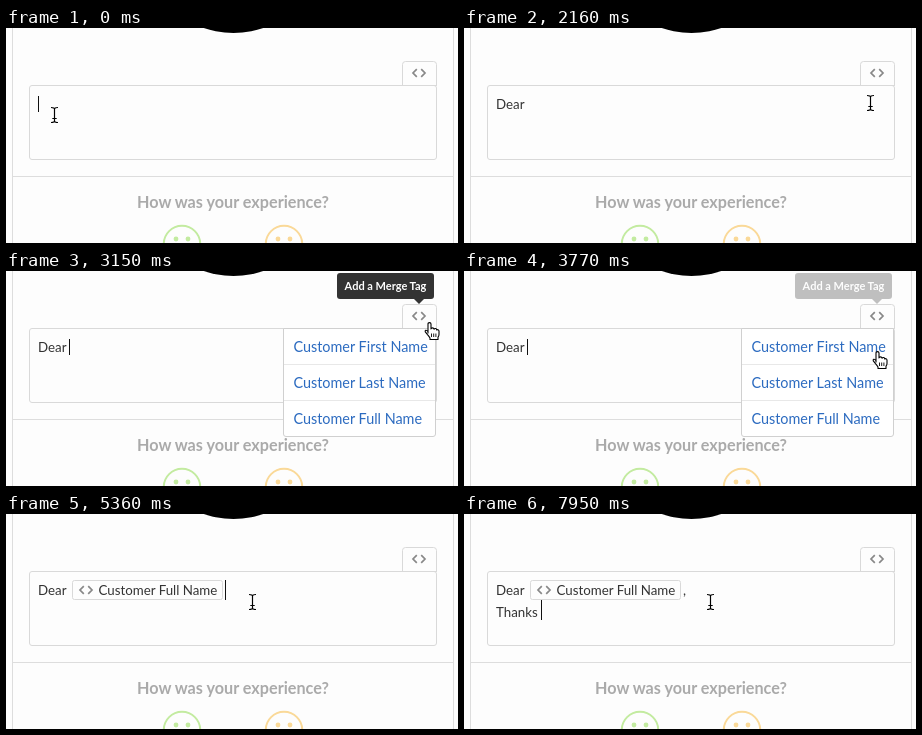
Recreate the animation shown at these times as an HTML page. Size 452 px wide and 215 px high, loop 8000 ms.

```html
<!DOCTYPE html>
<html lang="en">
<head>
<meta charset="utf-8">
<title>Inserting a merge tag</title>
<style>
  html, body { margin: 0; width: 100%; height: 100%; overflow: hidden; background: #fdfdfd; }
  svg { display: block; width: 452px; height: 215px; }
  text { font: 13.3px Lato, sans-serif; fill: #333; white-space: pre; }
  .box { fill: #fdfdfd; stroke: #d9d9d9; }
  .icon { fill: none; stroke: #888; stroke-width: 1.7; }
  .question { font-size: 16.2px; font-weight: bold; fill: #aaa; text-anchor: middle; }
  .tip { font-size: 11px; font-weight: bold; fill: #fff; text-anchor: middle; }
  #menu text { font-size: 14.4px; fill: #2c6bc0; }
  .face { fill: none; stroke-width: 2; }
</style>
</head>
<body>
<svg viewBox="0 0 452 215">
  <defs>
    <path id="chevrons" class="icon" d="M-2.2-3.8L-6 0L-2.2 3.8M2.2-3.8L6 0L2.2 3.8"/>
    <g id="smiley">
      <circle class="face" r="18.2"/>
      <circle cx="-6" cy="-5" r="2.4" stroke="none"/>
      <circle cx="6" cy="-5" r="2.4" stroke="none"/>
    </g>
  </defs>

  <path d="M6.5 0V215M447.5 0V215M7 148.5H447" stroke="#ddd"/>
  <circle cx="227.5" cy="-86" r="91"/>
  <path class="box" d="M396.5 58V36.5q0-3 3-3h28q3 0 3 3V58"/>
  <rect class="box" x="23.5" y="57.5" width="407" height="74" rx="2.5"/>
  <path d="M397 57.5H430" stroke="#d9d9d9"/>
  <use href="#chevrons" x="413" y="45"/>
  <text class="question" x="227" y="180">How was your experience?</text>
  <use href="#smiley" x="176" y="216" fill="#c3eba0" stroke="#c3eba0"/>
  <use href="#smiley" x="278" y="216" fill="#fad998" stroke="#fad998"/>

  <text id="greeting" x="32" y="81"></text>
  <g id="chip">
    <rect class="box" x="66.5" y="66.5" width="150" height="19" rx="2"/>
    <use href="#chevrons" x="80" y="76"/>
    <text x="92.5" y="81">Customer Full Name</text>
  </g>
  <text id="comma" x="219" y="81">,</text>
  <text id="body" x="32" y="103"></text>
  <rect id="caret" width="1" fill="#111"/>

  <g id="menu">
    <path d="M277.5 57.5H429.5V163q0 2.5-2.5 2.5H280q-2.5 0-2.5-2.5Z" fill="#fff" stroke="#d0d0d0"/>
    <path d="M278 93.5H429M278 129.5H429" stroke="#e8e8e8"/>
    <text x="287.5" y="81">Customer First Name</text>
    <text x="287.5" y="117">Customer Last Name</text>
    <text x="287.5" y="153">Customer Full Name</text>
  </g>
  <g id="tooltip">
    <rect x="331" y="2" width="97" height="26" rx="3" fill="#333"/>
    <path d="M408 28H418L413 33Z" fill="#333"/>
    <text class="tip" x="379.5" y="19">Add a Merge Tag</text>
  </g>

  <g id="beam" fill="none">
    <path id="beamShape" d="M-3.5-7.5Q0-7.5 0-6Q0-7.5 3.5-7.5M0-6.5V6.5M-3.5 7.5Q0 7.5 0 6Q0 7.5 3.5 7.5M-2.2 3.5H2.2" stroke="#fff" stroke-width="2.4"/>
    <use href="#beamShape" style="display:none"/>
    <path d="M-3.5-7.5Q0-7.5 0-6Q0-7.5 3.5-7.5M0-6.5V6.5M-3.5 7.5Q0 7.5 0 6Q0 7.5 3.5 7.5M-2.2 3.5H2.2" stroke="#000" stroke-width="1.2"/>
  </g>
  <!-- The origin is the fingertip. -->
  <g id="hand" stroke="#000" stroke-width="1.1" stroke-linejoin="round">
    <path fill="#fff" d="M-1.5 11V2Q-1.5.6 0 .6T1.5 2V7Q1.7 5.9 3 5.9T4.5 7.2Q4.8 6.4 6 6.5T7.2 8Q7.8 7.4 8.6 7.7T9.5 9V12.5Q9.5 14 8.5 15.2V17.5H.5V16Q-.4 14.4-2 12.6L-4.2 9.9Q-4.7 8.8-3.8 8.3T-1.5 9.6Z"/>
    <path d="M2 11.5V15M4.2 11.5V15M6.4 11.5V15" stroke-width=".9"/>
  </g>
  <path id="arrow" d="M0 0V14L3.2 11L5.4 16.4L8 15.3L5.7 10.2H10Z" stroke="#fff" stroke-width="1.2" paint-order="stroke"/>
</svg>
<script>
const LOOP = 8000;
const el = Object.fromEntries([...document.querySelectorAll('[id]')].map(n => [n.id, n]));

const greetingKeys = [810, 990, 1260, 1350, 1440];
const bodyKeys = [7330, 7500, 7590, 7680, 7770, 7860, 7950];
const caretHidden = [[360, 810], [1980, 2520], [4910, 5360], [6430, 6970]];
const menuFade = [[0, 0], [2970, .4], [3060, .8], [3150, 1], [4390, 0]];
const tooltipFade = [[0, 0], [2520, .5], [2610, 1], [3600, .7], [3690, .3], [3780, 0]];

// time, cursor, x, y
const pointer = [
  [0, 'beam', 48, 87], [1980, 'beam', 130, 110], [2070, 'beam', 310, 104], [2160, 'beam', 406, 75],
  [2430, 'arrow', 441, 63], [2520, 'hand', 433, 55], [2610, 'hand', 426, 52], [2700, 'hand', 423, 51],
  [3510, 'hand', 422, 54], [3600, 'hand', 419, 64], [3690, 'hand', 413, 80], [3780, 'hand', 405, 99],
  [3860, 'hand', 397, 117], [3950, 'hand', 388, 131], [4040, 'hand', 381, 139], [4130, 'hand', 378, 141],
  [4390, 'arrow', 378, 142], [4570, 'arrow', 372, 139], [4660, 'beam', 343, 124],
  [4740, 'beam', 296, 105], [4820, 'beam', 260, 92], [4910, 'beam', 246, 88]
];

const latest = (keys, t) => keys.findLast(k => k[0] <= t);
const typed = (text, keys, t) => text.slice(0, keys.filter(k => k <= t).length);
const show = (node, on) => node.style.display = on ? '' : 'none';

function place(node, attrs) {
  for (const name in attrs) node.setAttribute(name, attrs[name]);
}

function lineEnd(node) {
  return 32 + (node.textContent ? Math.floor(node.getComputedTextLength() + .2) : 0);
}

function caretBox(t) {
  if (t < 4390) return { x: lineEnd(el.greeting), y: 68, height: 16 };
  if (t < 5890) return { x: t < 5630 ? 219 : 222, y: 66, height: 20 };
  return { x: lineEnd(el.body), y: 86, height: 20 };
}

function draw(t) {
  el.greeting.textContent = typed('Dear ', greetingKeys, t);
  el.body.textContent = typed('Thanks ', bodyKeys, t);
  show(el.chip, t >= 4390);
  show(el.comma, t >= 5630);
  show(el.caret, !caretHidden.some(([from, to]) => t >= from && t < to));
  place(el.caret, caretBox(t));
  el.menu.style.opacity = latest(menuFade, t)[1];
  el.tooltip.style.opacity = latest(tooltipFade, t)[1];

  const [, cursor, x, y] = latest(pointer, t);
  for (const name of ['beam', 'hand', 'arrow']) show(el[name], name === cursor);
  place(el[cursor], { transform: `translate(${x + .5} ${y})` });
}

const start = performance.now();
function tick() {
  draw((performance.now() - start) % LOOP);
  requestAnimationFrame(tick);
}
tick();
</script>
</body>
</html>
```
